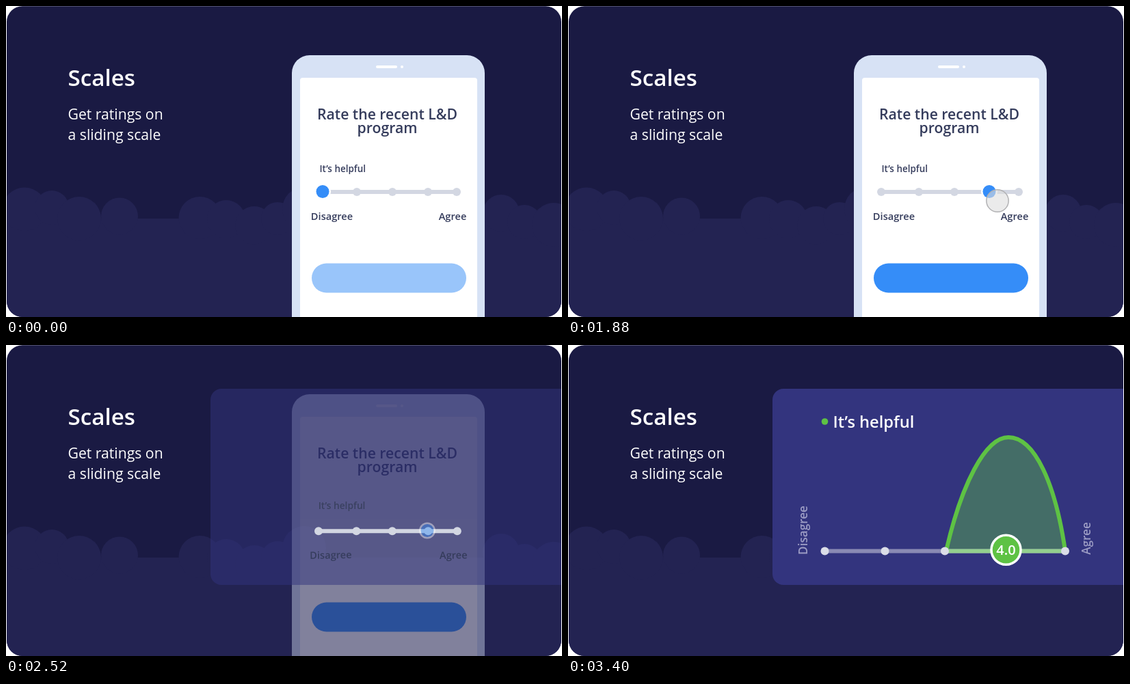
An HTML page for the animation above (4.44 s loop, 813 by 455 pixels).

```html
<!DOCTYPE html>
<html lang="en">
<head>
<meta charset="utf-8">
<title>Scales</title>
<style>
  html, body { margin: 0; width: 100%; height: 100%; overflow: hidden; background: #fff; }
  svg { display: block; width: 813px; height: 455px; }
  text { font-family: "Open Sans", "Noto Sans", sans-serif; font-weight: 600; }
  .mid { text-anchor: middle; }
  .lead { font-size: 21.2px; font-weight: 400; }
  .ask { font-size: 21.2px; fill: #353c5c; }
</style>
</head>
<body>
<svg viewBox="0 0 813 455">
  <clipPath id="card"><rect x="1" y=".15" width="811" height="454.85" rx="23"/></clipPath>
  <g clip-path="url(#card)">
    <rect width="813" height="455" fill="#1a1a43"/>
    <g id="clouds" fill="#232352"><rect y="311" width="813" height="144"/></g>
    <g fill="#fff">
      <text x="90.5" y="117" font-size="33.2">Scales</text>
      <text class="lead" x="90.5" y="165.5">Get ratings on</text>
      <text class="lead" x="90.5" y="195.5">a sliding scale</text>
    </g>

    <g id="phone">
      <rect x="418" y="72" width="282" height="420" rx="26" fill="#d7e2f5"/>
      <rect x="430" y="105" width="259" height="380" rx="4" fill="#fff"/>
      <rect x="541" y="87" width="31" height="4" rx="2" fill="#fff"/>
      <circle cx="579" cy="89" r="2" fill="#fff"/>
      <text class="ask mid" x="557.5" y="165.5">Rate the recent L&amp;D</text>
      <text class="ask mid" x="557.5" y="185.5">program</text>
      <rect id="button" x="447" y="376.5" width="226" height="43" rx="21.5"/>
    </g>

    <rect id="panel" x="299" y="64" width="540" height="287" rx="16" fill="#33347e"/>
    <path id="area" fill="#5ec244" fill-opacity=".4"/>
    <line id="track" stroke-width="6"/>
    <line id="range" x1="551" x2="727" y1="301.5" y2="301.5" stroke="#94d08e" stroke-width="6"/>
    <path id="curve" fill="none" stroke="#5ec244" stroke-width="6"/>
    <g id="dots"></g>
    <g id="thumb">
      <circle r="12" fill="#fff"/>
      <circle r="9.5" fill="#358df8"/>
    </g>

    <circle id="bullet" cx="375.5" cy="112" r="4.8" fill="#5ec244"/>
    <text id="label">It’s helpful</text>
    <text id="low" class="mid">Disagree</text>
    <text id="high" class="mid">Agree</text>

    <g id="badge">
      <circle r="21.5" fill="#5ec244" stroke="#fff" stroke-width="3.5"/>
      <text class="mid" y="7.5" font-size="20" fill="#fff">4.0</text>
    </g>
    <circle id="cursor" fill="#dedede" fill-opacity=".6" stroke="#b2b2b4" stroke-width="1.5"/>
  </g>
</svg>
<script>
const LOOP = 4440, STEP = 40;
const INK = [53, 60, 92], WHITE = [255, 255, 255], FADED = [156, 156, 196];
const $ = id => document.getElementById(id);
const mix = (a, b, p) => a + (b - a) * p;
const tint = (a, b, p) => `rgb(${a.map((v, i) => Math.round(mix(v, b[i], p)))})`;

function set(el, attrs) {
  for (const key in attrs) el.setAttribute(key, attrs[key]);
}

function addCircle(parent, cx, cy, r) {
  const el = document.createElementNS("http://www.w3.org/2000/svg", "circle");
  set(el, { cx, cy, r });
  return parent.appendChild(el);
}

[
  [27, 297.5, 32], [67, 295, 25], [107, 311, 32], [166, 307.5, 27],
  [283.5, 310, 31], [322, 312, 28], [363, 321, 28], [397, 311, 24],
  [436, 297, 32], [724, 303, 27], [758, 316, 25], [801, 320, 32]
].forEach(c => addCircle($("clouds"), ...c));

const from = [458, 513, 565, 617, 659];
const to = [375.5, 463.5, 551, 639.5, 727];
const dots = from.map(x => addCircle($("dots"), x, 272, 6));

function placeEnd(id, x0, x1, y1, p, colorP) {
  const x = mix(x0, x1, p), y = mix(313, y1, p);
  set($(id), {
    transform: `translate(${x} ${y}) rotate(${-90 * p})`,
    "font-size": mix(14.6, 17.1, p),
    fill: tint(INK, FADED, colorP)
  });
}

function drawCurve(h) {
  const top = 301 - 166 * h, low = 301 - 96 * h ** 1.5;
  const d = `M553 301C${mix(590, 575, h)} ${low} ${mix(580, 610, h)} ${top} ${mix(640, 644, h)} ${top}` +
    `C${mix(696, 683, h)} ${top} ${mix(694, 713, h)} ${low} 727 301`;
  const opacity = h > 0 ? 1 : 0;
  set($("curve"), { d, opacity });
  set($("area"), { d, opacity });
}

function drawCursor(t, drag, ramp) {
  const m = ramp(1880, 2280), n = 1 - m;
  const held = t >= 880 && t < 1880;
  const released = t >= 1880;
  set($("cursor"), {
    cx: released ? 628 * n * n + 1320 * n * m + 588 * m * m : mix(472, 628, drag),
    cy: released ? mix(285, 385, m) : mix(281.5, 282.5, drag),
    r: held ? 14.5 : 16.2,
    opacity: t < 640 ? 0 : 1 - ramp(2280, 2400)
  });
}

function draw(t) {
  const ramp = (a, b) => {
    const p = Math.min(1, Math.max(0, (t - a) / (b - a)));
    return (1 - Math.cos(Math.PI * p)) / 2;
  };
  const drag = ramp(840, 1640);
  const shown = 1 - ramp(2400, 2620);
  const move = ramp(2490, 2920);

  // phone
  set($("phone"), { opacity: shown });
  set($("button"), { fill: tint([153, 197, 250], [53, 141, 248], ramp(840, 1120)) });
  set($("thumb"), { opacity: shown, transform: `translate(${mix(463, 616, drag)} 271.5)` });
  drawCursor(t, drag, ramp);

  // scale turning into the chart axis
  const y = mix(272, 301.5, move);
  const xs = from.map((x, i) => mix(x, to[i], move));
  dots.forEach((dot, i) => set(dot, { cx: xs[i], cy: y }));
  set($("dots"), { fill: tint([211, 215, 226], [219, 221, 232], Math.min(1, 4 * move)) });
  set($("track"), { x1: xs[0], x2: xs[4], y1: y, y2: y, stroke: tint([211, 215, 226], [138, 138, 180], move) });

  // labels
  const q = move ** 0.83;
  set($("label"), {
    x: mix(458.5, 387.5, q), y: mix(243, 120.5, q),
    "font-size": mix(13.45, 23.7, q), fill: tint(INK, WHITE, q)
  });
  placeEnd("low", 476.5, 350, 271, move, move);
  placeEnd("high", 653, 764, 283, move, move ** 2);

  // chart
  set($("panel"), { opacity: ramp(2420, 2620) });
  set($("bullet"), { opacity: ramp(2760, 2920) });
  set($("range"), { opacity: ramp(2780, 2920) });
  drawCurve(ramp(2820, 3180));
  const pop = ramp(3120, 3400);
  set($("badge"), { opacity: pop, transform: `translate(640.5 299.8) scale(${pop})` });
}

function frame() {
  draw(Math.floor(performance.now() % LOOP / STEP) * STEP);
  requestAnimationFrame(frame);
}
frame();
</script>
</body>
</html>
```
